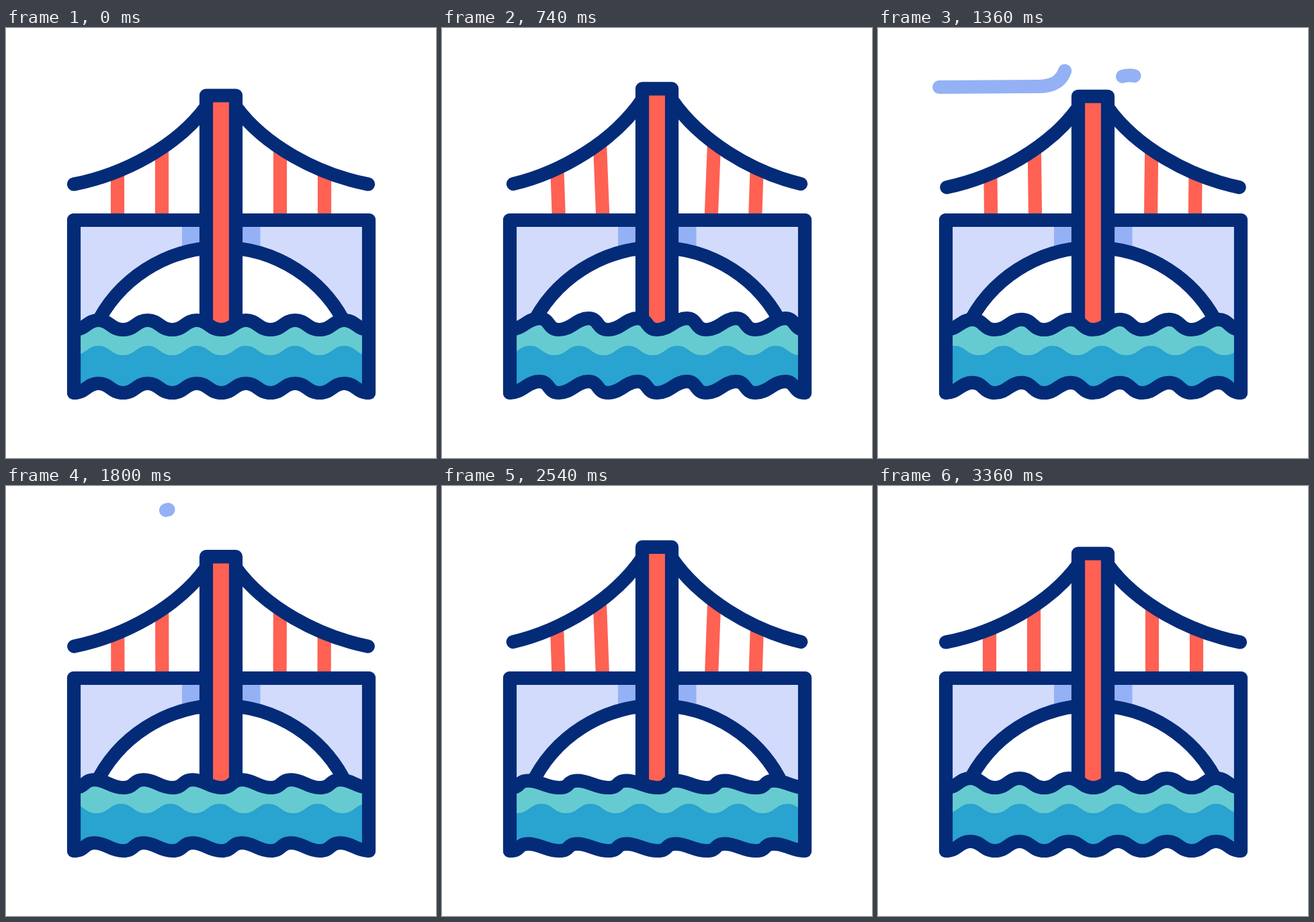
An HTML page that plays this animation: 640 by 640 pixels, repeating every 3.38 s.

```html
<!DOCTYPE html>
<html lang="en">
<head>
<meta charset="utf-8">
<title>Bridge</title>
<style>
  html, body { margin: 0; width: 100%; height: 100%; overflow: hidden; background: #fff; }
  svg { display: block; width: 100vw; height: 100vh; }
  .line { fill: none; stroke: #042b78; stroke-width: 20.2; stroke-linecap: round; stroke-linejoin: round; }
  .hanger { stroke: #ff6153; stroke-width: 20.2; }
  .trim { fill: none; stroke-width: 20.2; stroke-linecap: round; }
  .wind { stroke: #93b1f4; }
  .splash { stroke: #29a3cf; }
</style>
</head>
<body>
<svg viewBox="0 0 640 640">
  <clipPath id="basin"><path d="M101 286H540V560H101Z"/></clipPath>

  <path class="trim wind" id="upperWind" d="M90 88L238 87C262 87 273 78 278 64C283 48 272 34 254 34C246 34 241 35 238 36"/>
  <path class="trim wind" id="lowerWind" d="M130 124H372C390 124 401 112 401 98C401 80 388 70.5 375 70.5C371 70.5 367 71 364 72"/>

  <g id="half">
    <path class="hanger" id="outerHanger"/>
    <path class="hanger" id="innerHanger"/>
    <path class="line" id="cable"/>
  </g>
  <use href="#half" transform="matrix(-1 0 0 1 640 0)"/>

  <path fill="#d2dbfc" d="M101 286H540V450H101Z"/>
  <path fill="#93b1f4" d="M262 286H378.500V345H262Z"/>
  <path class="line" style="fill:#fff" d="M132 447A207 207 0 0 1 508 447"/>
  <path class="line" d="M101 286H540"/>
  <path class="line" id="tower" style="fill:#ff6153"/>

  <path id="shallow" fill="#66cbd0"/>
  <path id="deep" fill="#29a3cf" clip-path="url(#basin)"/>
  <path class="line" id="surface"/>
  <path class="line" id="bed"/>
  <path class="line" d="M101 286V543M540 286V543"/>

  <path class="trim splash" id="splashLeft" d="M279 429L260 407"/>
  <path class="trim splash" id="splashMid" d="M322 424L319 387"/>
  <path class="trim splash" id="splashRight" d="M367 423L381 405"/>
</svg>
<script>
const LOOP = 3380;
const STEP = 439 / 6; // wavelength
const el = id => document.getElementById(id);
const setPath = (id, d) => el(id).setAttribute('d', d);
const ease = p => (1 - Math.cos(Math.PI * Math.min(1, Math.max(0, p)))) / 2;
const ramp = (t, from, to) => ease((t - from) / (to - from));

// Eased value along matching lists of key times and values.
function track(t, times, values) {
  return times.slice(1).reduce((v, end, i) =>
    v + (values[i + 1] - values[i]) * ramp(t, times[i], end), values[0]);
}

const bridgeTimes = [130, 735, 1695, 2420, 3260];
const waterTimes = [130, 860, 2335, 3120];

// Troughs stay at the given height while the crests lean and lift.
function wave(start, count, y, lean = 0) {
  const top = y - 14 - lean * 0.4;
  let d = `M${start} ${y}`;
  for (let i = 0; i < count; i++) {
    const x = start + i * STEP, crest = x + STEP / 2 + lean, end = x + STEP;
    d += `C${x + 18} ${y} ${crest - 17} ${top} ${crest} ${top}` +
         `C${crest + 17} ${top} ${end - 18} ${y} ${end} ${y}`;
  }
  return d;
}

// Shows the part of a path between its moving tail and head.
function trim(id, t, headFrom, headTo, tailFrom, tailTo) {
  const path = el(id), length = path.getTotalLength();
  const head = ramp(t, headFrom, headTo) * length;
  const tail = ramp(t, tailFrom, tailTo) * length;
  const visible = t > headFrom && t < tailTo && head > tail;
  path.style.display = visible ? '' : 'none';
  path.style.strokeDasharray = `${head - tail} ${length * 2}`;
  path.style.strokeDashoffset = -tail;
}

function drawBridge(t) {
  const rise = track(t, bridgeTimes, [0, -10.2, 5.5, -10.2, 0]);
  const pull = track(t, bridgeTimes, [0, 5, 0, 5, 0]);
  const drop = track(t, bridgeTimes, [0, -0.5, 6.5, -0.5, 0]);
  const sag = 0.55 * (rise + drop);

  setPath('tower', `M298 450V${100.5 + rise}H342V450`);
  setPath('cable', `M${101 + pull} ${232.5 + drop}` +
    `C${175 + pull * 0.8} ${218 + drop * 0.7 + rise * 0.3} ` +
    `${255 + pull * 0.3} ${176 + rise * 0.8 + drop * 0.2} 298 ${117 + rise}`);
  setPath('outerHanger', `M${166 + pull * 1.05} ${213 + sag}L${166 + pull * 1.6} 286`);
  setPath('innerHanger', `M${232 + pull * 0.6} ${179 + sag}L${232 + pull * 1.5} 286`);
}

function drawWater(t) {
  const lean = track(t, waterTimes, [0, 7.5, -11, 0]);
  const drift = -STEP * ramp(t, 100, 3340);
  const surface = wave(101, 6, 449, lean);
  setPath('surface', surface);
  setPath('bed', wave(101, 6, 543, lean));
  setPath('shallow', surface + 'V510H101Z');
  setPath('deep', wave(101 + drift, 7, 487) + `V535H${101 + drift}Z`);
}

function draw(t) {
  drawBridge(t);
  drawWater(t);
  trim('lowerWind', t, 760, 1220, 960, 1430);
  trim('upperWind', t, 960, 1553, 1340, 1840);
  trim('splashLeft', t, 2060, 2310, 2260, 2500);
  trim('splashMid', t, 2040, 2300, 2260, 2520);
  trim('splashRight', t, 2060, 2310, 2260, 2500);
}

const start = performance.now();
function frame() {
  draw((performance.now() - start) % LOOP);
  requestAnimationFrame(frame);
}
frame();
</script>
</body>
</html>
```
